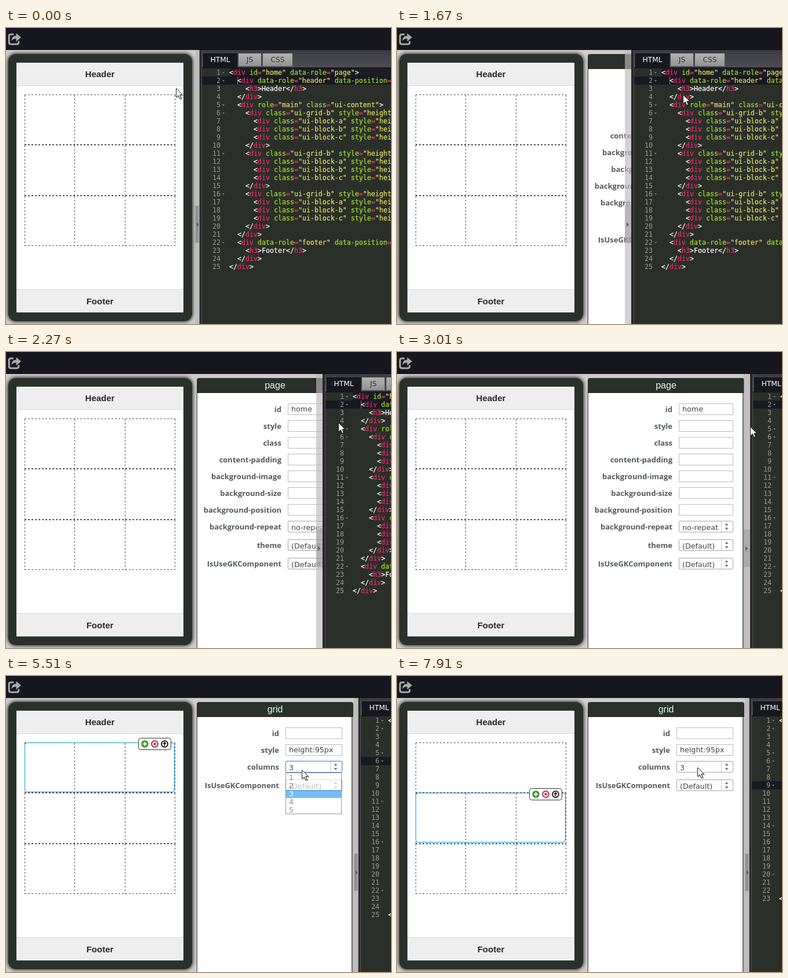
These frames come from a looping animation (664 px wide and 512 px high, 8000 ms). An HTML page:

```html
<!DOCTYPE html>
<html lang="en">
<head>
<meta charset="utf-8">
<title>Page builder</title>
<style>
html, body { margin: 0; width: 100%; height: 100%; overflow: hidden; }
#stage { position: relative; width: 664px; height: 512px; overflow: hidden; background: #2a3029; }
#stage div, #stage svg { position: absolute; box-sizing: border-box; }
#bar { left: 0; top: 0; width: 664px; height: 38px; background: #17181f; border-bottom: 1px solid #0e0e13; }
#pane { left: 0; top: 38px; height: 474px; overflow: hidden; background: #d0cccc; }
#inner { left: 0; top: -38px; width: 664px; height: 512px; }
#device { left: 4px; top: 45px; width: 317px; height: 462px; border-radius: 13px; background: #2a312a; box-shadow: 0 0 6px 1px #222; }
#screen { left: 18px; top: 60px; width: 288px; height: 432px; background: #fff; }
.band { left: 0; width: 288px; height: 40px; background: #eee; color: #292929; text-align: center;
  font: bold 15px/40px "Liberation Sans", Arial, sans-serif; }
#panel { left: 329px; top: 45px; width: 270px; height: 480px; }
#title { width: 270px; height: 26px; background: #2a312a; border-radius: 4px 4px 0 0; color: #e6f7fa;
  text-align: center; font: 16px/25px "Liberation Sans", Arial, sans-serif; }
#body { top: 26px; width: 268px; height: 454px; background: #fff; border: solid #454a45; border-width: 0 1px; box-shadow: 1px 0 3px #777; }
.label { white-space: nowrap; color: #555a5a; font: bold 13px/20px "Open Sans", "Noto Sans", sans-serif; }
.field { height: 20px; background: #fff; border: 1px solid #bcbcbc; padding-left: 5px; overflow: hidden;
  color: #444; font: 12.7px/18px "DejaVu Sans", sans-serif; }
.select { border-color: #a5a5a5; border-radius: 2px; }
.select .text { left: 5px; top: 2px; height: 15px; overflow: hidden; line-height: 18px; }
.select svg { right: 0; top: 0; }
#list { left: 482px; top: 167px; width: 97px; height: 72px; background: #fff; border: 1px solid #666; }
.item { left: 0; width: 95px; height: 14px; padding-left: 5px; color: #555; font: 12.5px/14px "DejaVu Sans", sans-serif; }
.item.on { background: #3399f0; color: #fff; }
#split { top: 38px; height: 474px; background: #bdbdbd; border-right: 1px solid #8b8b8b; }
#split.drag { background: rgba(190,185,185,.65); border: 0; }
#grip { left: 0; top: 269px; width: 100%; height: 65px; background: #929292; border: 1px solid #a8a8a8; }
#split.drag #grip { background: rgba(130,130,130,.35); border: 0; }
#editor { left: 333px; top: 0; width: 700px; height: 512px; background: #2a3029; border-left: 1px solid #1d1d20; clip-path: inset(38px 0 0 0); }
#tabs { left: 0; top: 38px; width: 700px; height: 32px; background: linear-gradient(#3b3b42, #4d4d53); border-bottom: 2px solid #191a21; }
#edge { left: 0; top: 38px; width: 4px; height: 474px; background: #29292d; border-right: 1px solid #505256; }
.tab { top: 6px; height: 22px; background: linear-gradient(#b2b2b2, #929292); color: #333; text-align: center;
  font: 12.3px/22px "DejaVu Sans", sans-serif; }
.tab.on { height: 26px; background: #17181f; color: #fff; border: solid #0d0d10; border-width: 1px 1px 0; line-height: 20px; }
#active { left: 4px; width: 696px; height: 14px; background: #181921; }
#shade { left: 51px; top: 70px; width: 649px; height: 14px; background: #1b1d22; }
#caret { left: 61px; width: 1px; height: 14px; background: #77777c; }
#hint { left: 325px; width: 100px; height: 28px; background: #423f3a; }
.line, .num { height: 14px; white-space: pre; font: 11.628px/14px "DejaVu Sans Mono", monospace; color: #fff; }
.line { -webkit-text-stroke: .2px; }
.num { left: 0; width: 36px; text-align: right; color: #9a9c94; }
.fold { left: 39px; border: solid transparent; border-width: 3px 2.5px 0; border-top-color: #75786f; }
.tag { color: #f92672; } .attr { color: #a6e22e; } .str { color: #ece462; }
</style>
</head>
<body>
<div id="stage">
  <div id="pane"><div id="inner">
    <div id="device"></div>
    <div id="screen">
      <div class="band" style="top:0;border-bottom:1px solid #d8d8d8">Header</div>
      <div class="band" style="bottom:0;border-top:1px solid #d8d8d8">Footer</div>
    </div>
    <svg width="330" height="400" fill="none">
      <path id="cells" stroke="#555" stroke-dasharray="3" shape-rendering="crispEdges"/>
      <g id="pick">
        <rect x="32.5" y="115.5" width="258" height="85" rx="4" stroke="#0d99e0"/>
        <rect x="228.5" y="107.5" width="56" height="20" rx="4" fill="#fff" stroke="#333"/>
        <circle cx="239.5" cy="117.5" r="6.3" fill="#3c9a2e"/>
        <path d="M239.5 114v7M236 117.5h7" stroke="#fff" stroke-width="2"/>
        <circle cx="256.5" cy="117.5" r="5.4" stroke="#b5123e" stroke-width="1.8"/>
        <path d="M254.5 115.5l4 4m0-4l-4 4" stroke="#b5123e" stroke-width="1.7"/>
        <circle cx="273.5" cy="117.5" r="5.4" stroke="#111" stroke-width="1.8"/>
        <path d="M273.5 121v-6m-2.6 2.4l2.6-2.6l2.6 2.6" stroke="#111" stroke-width="1.6"/>
      </g>
    </svg>
    <div id="panel"><div id="body"></div><div id="title"></div></div>
    <div id="pageForm"></div>
    <div id="gridForm"></div>
    <div id="list"></div>
  </div></div>
  <div id="editor">
    <div id="tabs">
      <div class="tab on" style="left:6px;width:59px">HTML</div>
      <div class="tab" style="left:67px;width:39px">JS</div>
      <div class="tab" style="left:109px;width:51px">CSS</div>
    </div>
    <div id="shade"></div>
    <div id="active"><div id="caret"></div></div>
    <div id="codeA"></div>
    <div id="codeB"></div>
    <div id="hint"></div>
    <div id="edge"></div>
  </div>
  <div id="split"><div id="grip"></div>
    <svg style="left:2px;top:297px" width="6" height="10"><path d="M1 1l4 4l-4 4z" fill="#5c5c5c"/></svg>
  </div>
  <div id="bar"><svg width="30" height="34" fill="none" stroke="#a9a9a9">
    <path d="M13 11H8.5Q5.2 11 5.2 14.3V24.7Q5.2 28 8.5 28H18.5Q21.8 28 21.8 24.7V22.5" stroke-width="3"/>
    <path d="M9.5 22.5Q9.5 13.5 17.5 13.5V9L26 16.3L17.5 23.5V18.5Q12.5 18 9.5 22.5Z" fill="#a9a9a9" stroke="none"/>
  </svg></div>
  <svg id="cursor" width="18" height="26" style="left:0;top:0;overflow:visible">
    <path d="M2 2.5V18L6 14.5L8.5 20.5L11.5 19L9 13.5H14Z" fill="#000" opacity=".25"/>
    <path d="M.5.5V16L4.2 12.6L6.8 18.5L9.3 17.4L6.8 11.7H11.7Z" fill="#fff" stroke="#222"/>
  </svg>
</div>
<script>
const LOOP = 8000;
const $ = id => document.getElementById(id);

function add(parent, cls, css, html = '') {
  const el = document.createElement('div');
  el.className = cls;
  el.style.cssText = css;
  el.innerHTML = html;
  parent.append(el);
  return el;
}

// Property forms
function addRow(form, x, y, label, value = '', select = false) {
  add(form, 'label', `right:${664 - x + 11}px;top:${y}px`, label);
  const box = `left:${x}px;top:${y}px;width:${580 - x}px`;
  if (!select) return add(form, 'field', box, value);
  return add(form, 'field select', box, `<div class="text">${value}</div>
    <svg width="20" height="18"><path d="M.5 0V18" stroke="#ccc"/>
    <path d="M6.5 7l3-4l3 4zM6.5 11l3 4l3-4z" fill="#777"/></svg>`);
}
for (const id of ['pageForm', 'gridForm']) $(id).style.cssText = 'left:0;top:0;width:664px;height:512px';
['id', 'style', 'class', 'content-padding', 'background-image', 'background-size', 'background-position']
  .forEach((name, i) => addRow($('pageForm'), 486, 89 + 29 * i, name, i ? '' : 'home'));
addRow($('pageForm'), 486, 292, 'background-repeat', 'no-repeat', true);
addRow($('pageForm'), 486, 324, 'theme', '(Default)', true);
addRow($('pageForm'), 486, 356, 'IsUseGKComponent', '(Default)', true);
addRow($('gridForm'), 482, 89, 'id');
addRow($('gridForm'), 482, 118, 'style', 'height:95px');
const columns = addRow($('gridForm'), 482, 147, 'columns', '3', true);
addRow($('gridForm'), 482, 179, 'IsUseGKComponent', '(Default)', true);
const items = [1, 2, 3, 4, 5].map(n => add($('list'), 'item', `top:${14 * n - 13}px`, n));

// Code listing
function sourceLines(counts) {
  const out = [[0, '<div id="home" data-role="page">'],
    [1, '<div data-role="header" data-position="fixed">'], [2, '<h3>Header</h3>'], [1, '</div>'],
    [1, '<div role="main" class="ui-content">']];
  for (const n of counts) {
    out.push([2, `<div class="ui-grid-${n > 1 ? 'b' : 'solo'}" style="height:95px">`]);
    for (const c of 'abc'.slice(0, n)) out.push([3, `<div class="ui-block-${c}" style="height:100%"></div>`]);
    out.push([2, '</div>']);
  }
  out.push([1, '</div>'], [1, '<div data-role="footer" data-position="fixed">'],
    [2, '<h3>Footer</h3>'], [1, '</div>'], [0, '</div>']);
  return out;
}
const span = (cls, s) => `<span class="${cls}">${s}</span>`;
const paint = s => s.replace(/<(\/?)(\w+)|([\w-]+)=("[^"]*")|>/g, (all, slash, tag, attr, str) =>
  tag ? '&lt;' + slash + span('tag', tag)
  : attr ? span('attr', attr) + span('tag', '=') + span('str', str) : '&gt;');
function addCode(host, counts) {
  host.style.cssText = 'left:0;top:70px;width:700px;height:440px';
  sourceLines(counts).forEach(([depth, text], i) => {
    const top = `top:${14 * i}px`;
    add(host, 'num', top, i + 1);
    if (!text.includes('</')) add(host, 'fold', `top:${14 * i + 6}px`);
    add(host, 'line', `${top};left:${51 + 14 * depth}px`, paint(text));
  });
}
addCode($('codeA'), [3, 3, 3]);
addCode($('codeB'), [1, 3, 3]);

// Dashed grid: top and bottom of each row
const gridRows = [[115.5, 201.5], [202.5, 289.5], [290.5, 376.5]];
function drawCells(firstCount) {
  $('cells').setAttribute('d', gridRows.map(([top, bottom], i) => {
    const inner = i || firstCount > 1 ? [118.5, 205.5] : [];
    return `M32 ${top}H292M32 ${bottom}H292` +
      [32.5, ...inner, 291.5].map(x => `M${x} ${top}V${bottom}`).join('');
  }).join(''));
}

// Motion: time, then values
const bursts = [0, 130, 590, 790, 1250, 2090, 2950, 3140, 3810, 4650, 5390, 6410, 7490];
const pointer = [[0, 293, 104], [129, 293, 104], [130, 293, 105], [589, 293, 105], [590, 305, 105], [789, 305, 105],
  [790, 322, 105], [850, 334, 105], [1249, 334, 105], [1250, 342, 105], [1670, 493, 115], [2030, 548, 119],
  [2270, 573, 122], [2820, 609, 129], [3139, 609, 129], [3140, 590, 130], [3440, 380, 138], [3740, 199, 143],
  [3809, 199, 143], [3810, 212, 144], [3990, 254, 146], [4649, 254, 146], [4650, 270, 148], [5010, 500, 168],
  [5130, 510, 162], [5570, 510, 162], [5810, 510, 173], [6409, 510, 173], [6410, 498, 175], [6830, 286, 220],
  [7489, 286, 220], [7490, 300, 217], [7910, 518, 158], [LOOP, 518, 158]];
const drag = [[0, 0], [1249, 0], [1250, 4], [1670, 71], [2030, 193], [2270, 213], [2750, 276], [3139, 276], [3140, 274], [LOOP, 274]];

function stepTime(t) {
  const start = bursts.filter(b => b <= t).pop();
  return start + Math.floor((t - start) / 60) * 60;
}
function sample(keys, t) {
  const i = Math.max(1, keys.findIndex(k => k[0] >= t));
  const [a, b] = [keys[i - 1], keys[i]];
  const p = (t - a[0]) / (b[0] - a[0]);
  return a.slice(1).map((v, j) => Math.round(v + (b[j + 1] - v) * p));
}
const show = (el, on) => { el.style.display = on ? '' : 'none'; };

function render(t) {
  const q = stepTime(t);
  const [x, y] = sample(pointer, q);
  const [shift] = sample(drag, q);
  const dragging = t >= 1250 && t < 3140;
  const picked = t >= 4450, second = t >= 7290, single = t >= 6410;

  $('cursor').style.transform = `translate(${x}px,${y}px)`;
  $('editor').style.transform = `translateX(${shift}px)`;
  $('pane').style.width = 334 + shift + 'px';
  $('split').className = dragging ? 'drag' : '';
  $('split').style.left = (dragging ? 322 : 326) + shift + 'px';
  $('split').style.width = dragging ? '11px' : '8px';
  $('split').style.filter = t >= 850 && t < 1250 ? 'brightness(1.1)' : '';

  $('title').textContent = picked ? 'grid' : 'page';
  show($('pageForm'), !picked);
  show($('gridForm'), picked);
  show($('pick'), picked);
  $('pick').setAttribute('transform', `translate(0 ${second ? 87 : 0})`);
  drawCells(single ? 1 : 3);

  columns.firstChild.textContent = single && !second ? 1 : 3;
  const focused = t >= 5390 && !second;
  columns.style.borderColor = focused ? '#5b8fd6' : '';
  columns.style.boxShadow = focused ? '0 0 2px #5b9ae8' : '';
  show($('list'), t >= 5390 && t < 6410);
  $('list').style.opacity = Math.min(1, (q - 5390) / 60 * .33);
  const hot = y >= 169 ? 0 : 2;
  items.forEach((el, i) => el.classList.toggle('on', i === hot));

  show($('codeA'), !single);
  show($('codeB'), single);
  const line = second ? 9 : picked ? 6 : 2;
  $('active').style.top = 56 + 14 * line + 'px';
  show($('caret'), !picked);
  show($('shade'), !picked);
  show($('hint'), picked);
  $('hint').style.top = 98 + 14 * line + 'px';
}
function frame() {
  render(performance.now() % LOOP);
  requestAnimationFrame(frame);
}
frame();
</script>
</body>
</html>
```
